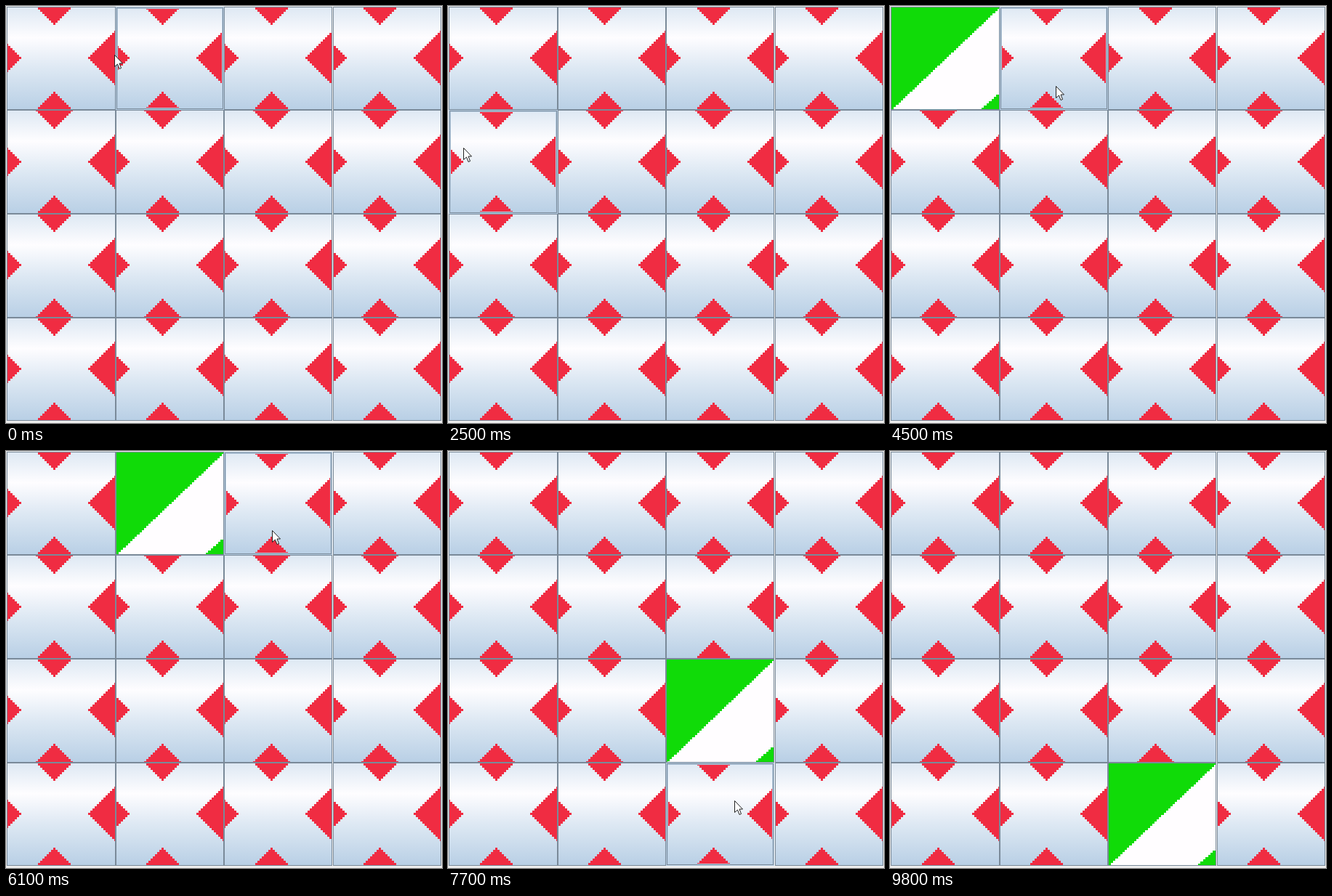
An HTML page with a canvas that plays this animation: 600 by 574 pixels, repeating every 9.9 s.

```html
<!DOCTYPE html>
<html lang="en">
<head>
<meta charset="utf-8">
<title>Card grid</title>
<style>
  html, body { margin: 0; width: 100%; height: 100%; overflow: hidden; background: #eee; }
  canvas { display: block; }
</style>
</head>
<body>
<canvas id="stage" width="600" height="574"></canvas>
<script>
const ctx = document.getElementById('stage').getContext('2d');
const LOOP = 9900, TICK = 100, SIZE = 4, STEP = 3;
const RED = '#f02c42', GREEN = '#10db08', LINE = '#7a8a99', GLOW = '#b8cfe5';
const arrow = new Path2D('M0 0V16L4 12.5L6.5 19L9 18L6.5 11.5H11Z');

// First and last pixel of a column or row
const colSpan = i => [Math.round(0.8 + 149.7 * i), Math.floor(150 + 149.4 * i)];
const rowSpan = i => [Math.round(0.6 + 142.75 * i), Math.round(142.3 + 142.6 * i)];

// The pointer waits on each stop, clicks there, then glides on
const STOPS = [
  { at: 3400, x: 139, y: 140 },
  { at: 4500, x: 228, y: 110 },
  { at: 6100, x: 366, y: 109 },
  { at: 7100, x: 386, y: 350 },
  { at: 7700, x: 394, y: 481 },
  { at: 9300, x: 625, y: 490 }
];
const WAIT = 0.4;

const mix = (a, b, u) => a + (b - a) * u;
const smooth = u => u * u * (3 - 2 * u);

// Opening sweep: out past the left edge and back to the first stop
function sweep(u) {
  return {
    x: mix(149, STOPS[0].x, u) - 110 * (1 - Math.cos(2 * Math.PI * u)),
    y: mix(67, STOPS[0].y, u) + 100 * Math.sin(Math.PI * u)
  };
}

function poseAt(time) {
  const next = STOPS.findIndex(stop => stop.at > time);
  if (next === 0) return { pointer: sweep(time / STOPS[0].at), open: null };
  if (next < 0) return { pointer: STOPS.at(-1), open: cardAt(STOPS.at(-2)) };

  const from = STOPS[next - 1], to = STOPS[next];
  const u = (time - from.at) / (to.at - from.at);
  const glide = smooth(Math.max(0, (u - WAIT) / (1 - WAIT)));
  const clicked = u < WAIT ? STOPS[next - 2] : from;
  return {
    pointer: { x: mix(from.x, to.x, glide), y: mix(from.y, to.y, glide) },
    open: clicked ? cardAt(clicked) : null
  };
}

// Card index under a point; leaving on the left keeps the edge card
function cardAt({ x, y }) {
  const col = Math.floor(Math.max(x + 2, 0) / 149.7);
  const row = Math.floor(y / 142.75);
  return col < SIZE ? row * SIZE + col : null;
}

function frame(color, x, y, w, h, inset) {
  ctx.strokeStyle = color;
  ctx.strokeRect(x + inset + 0.5, y + inset + 0.5, w - 1 - 2 * inset, h - 1 - 2 * inset);
}

// Stepped triangle widening from its tip along (dx, dy)
function spike(x, y, dx, dy, length) {
  for (let d = 0; d < length; d += STEP) {
    const half = d + STEP / 2;
    if (dy) ctx.fillRect(x - half, dy > 0 ? y + d : y - d - STEP, 2 * half, STEP);
    else ctx.fillRect(dx > 0 ? x + d : x - d - STEP, y - half, STEP, 2 * half);
  }
}

function drawBack(x, y, w, h, col, row) {
  const shade = ctx.createLinearGradient(0, y, 0, y + h);
  shade.addColorStop(0, '#dde8f3');
  shade.addColorStop(0.3, '#fefdff');
  shade.addColorStop(0.6, '#dde8f3');
  shade.addColorStop(1, GLOW);
  ctx.fillStyle = shade;
  ctx.fillRect(x, y, w, h);

  const ox = Math.round(149.4 * col), oy = Math.round(142.6 * row);
  ctx.fillStyle = RED;
  spike(ox + 66.5, oy + 26, 0, -1, 28);
  spike(ox + 66.5, oy + 118, 0, 1, 28);
  spike(ox + 21, oy + 71.5, -1, 0, 24);
  spike(ox + 113, oy + 71.5, 1, 0, 42);
}

function drawFace(x, y, w, h) {
  ctx.fillStyle = '#fffdff';
  ctx.fillRect(x, y, w, h);
  ctx.fillStyle = GREEN;
  for (let d = 0; d < h; d += STEP) {
    ctx.fillRect(x, y + d, Math.round(w * (1 - d / h)), STEP);
  }
  for (let d = 0; d < 22; d += STEP) {
    const width = Math.round(25 * (1 - d / 22));
    ctx.fillRect(x + w - width, y + h - d - STEP, width, STEP);
  }
}

function drawCard(col, row, hovered, open) {
  const [x, right] = colSpan(col), [y, bottom] = rowSpan(row);
  const w = right - x + 1, h = bottom - y + 1;
  ctx.save();
  ctx.beginPath();
  ctx.rect(x, y, w, h);
  ctx.clip();
  if (open) drawFace(x, y, w, h);
  else drawBack(x, y, w, h, col, row);
  if (hovered) [GLOW, LINE, GLOW].forEach((color, inset) => frame(color, x, y, w, h, inset));
  else frame(LINE, x, y, w, h, 0);
  ctx.restore();
}

function drawPointer({ x, y }) {
  ctx.save();
  ctx.translate(Math.round(x) + 0.5, Math.round(y) + 0.5);
  ctx.fillStyle = '#fff';
  ctx.strokeStyle = '#222';
  ctx.fill(arrow);
  ctx.stroke(arrow);
  ctx.restore();
}

function render(time) {
  const { pointer, open } = poseAt(time);
  const hovered = cardAt(pointer);
  ctx.fillStyle = '#eee';
  ctx.fillRect(0, 0, 600, 574);
  for (let card = 0; card < SIZE * SIZE; card++) {
    drawCard(card % SIZE, Math.floor(card / SIZE), card === hovered, card === open);
  }
  drawPointer(pointer);
}

function tick() {
  const time = performance.now() % LOOP;
  render(Math.floor(time / TICK) * TICK);
  requestAnimationFrame(tick);
}
tick();
</script>
</body>
</html>
```
